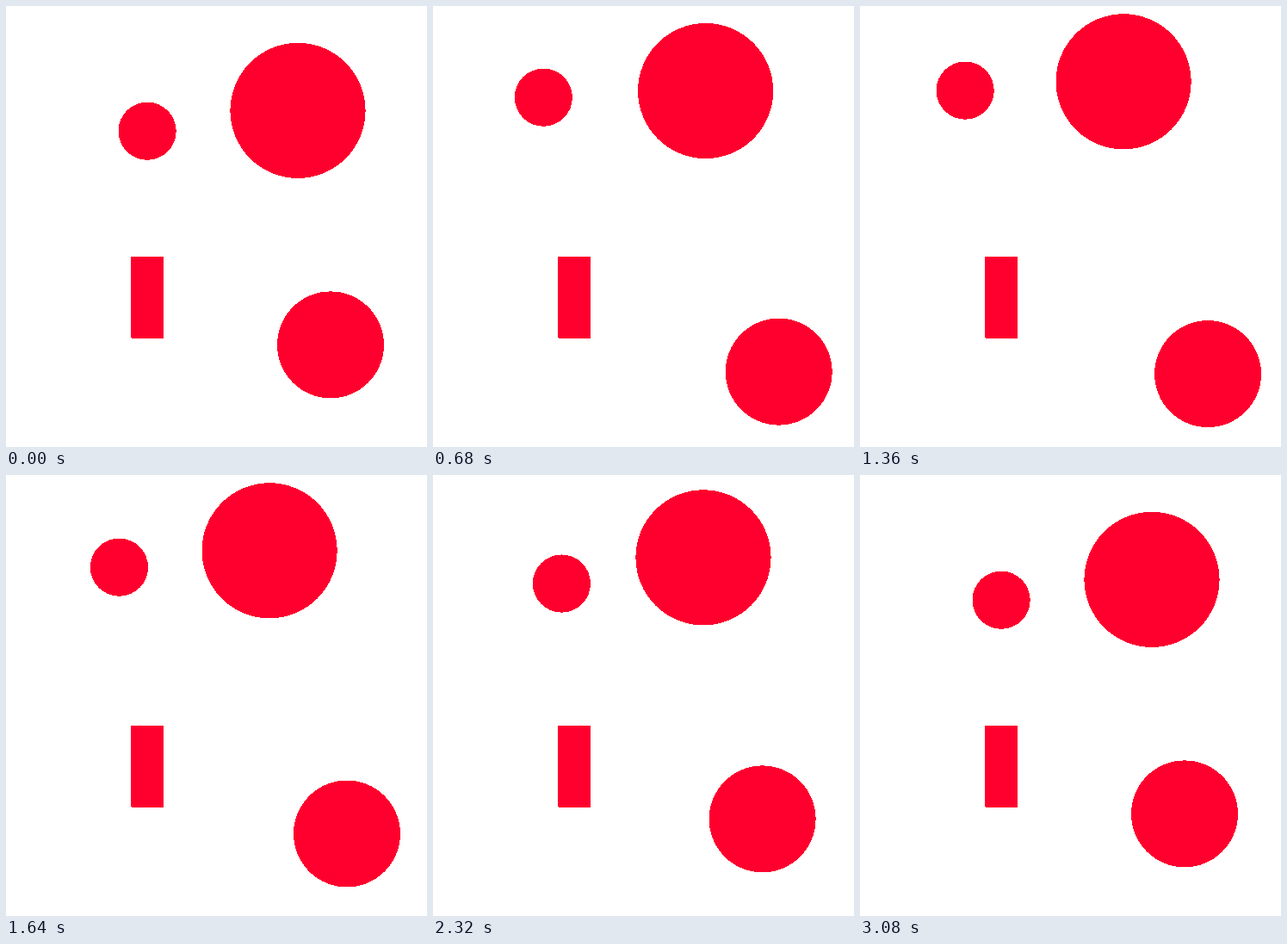
An HTML page for the animation above (3180 ms loop, 489 by 512 pixels).

```html
<!DOCTYPE html>
<html lang="en">
<head>
<meta charset="utf-8">
<title>Drifting circles</title>
<style>
  html, body { margin: 0; width: 100%; height: 100%; overflow: hidden; background: #fff; }
  svg { display: block; width: 489px; height: 512px; fill: #ff002e; shape-rendering: crispEdges; }
</style>
</head>
<body>
<svg viewBox="0 0 489 512">
  <path d="M145 291H183V386H146V385H145Z"/>
</svg>
<script>
  const LOOP = 3180, STEP = 40, LAST = 77;
  const LEG = 25, SLOT = 26; // steps moving, plus one step resting

  // Corner points of each circle's path
  const circles = [
    { r: 78.6, path: [[339, 121.4], [306.1, 87.8], [306.1, 87.8]] },
    { r: 33.6, path: [[164.1, 145.2], [111.5, 87.8], [144.8, 120]] },
    { r: 62, path: [[377, 393.4], [413.3, 439.3], [384.4, 401.3]] }
  ];

  const svg = document.querySelector('svg');
  for (const c of circles) {
    c.node = document.createElementNS(svg.namespaceURI, 'circle');
    c.node.setAttribute('r', c.r);
    svg.append(c.node);
  }

  function draw(time) {
    const step = Math.min(LAST, Math.floor((time % LOOP) / STEP));
    const leg = Math.floor(step / SLOT);
    const part = (step % SLOT) / LEG;
    for (const { node, path } of circles) {
      const from = path[leg], to = path[(leg + 1) % path.length];
      ['cx', 'cy'].forEach((name, i) =>
        node.setAttribute(name, (from[i] + (to[i] - from[i]) * part).toFixed(2)));
    }
  }

  const start = performance.now();
  function tick() {
    draw(performance.now() - start);
    requestAnimationFrame(tick);
  }
  tick();
</script>
</body>
</html>
```
